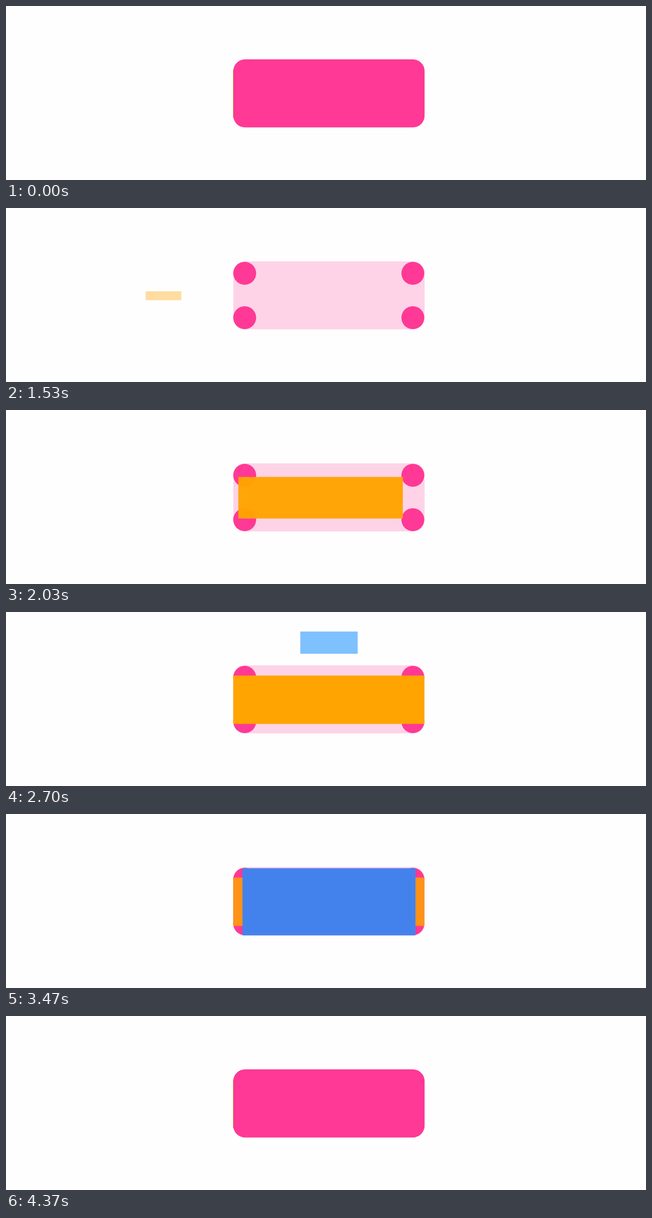
Recreate the animation shown at these times as an HTML page with a canvas. Size 1280 px wide and 349 px high, loop 4.41 s.

```html
<!DOCTYPE html>
<html lang="en">
<head>
<meta charset="utf-8">
<title>Rounded rectangle parts</title>
<style>
html, body { margin: 0; width: 100%; height: 100%; overflow: hidden; background: #fefefe; }
canvas { display: block; width: 1280px; height: 349px; }
</style>
</head>
<body>
<canvas id="stage" width="1280" height="349"></canvas>
<script>
const ctx = document.getElementById('stage').getContext('2d');
const LOOP = 4410;
const PINK = [255, 57, 149], ORANGE = [255, 164, 0], BLUE = [30, 144, 255];
const FAINT = 0.215;

const progress = (t, start, length) => Math.min(1, Math.max(0, (t - start) / length));
const easeOut = p => 1 - Math.pow(1 - p, 1.7);
// Travel settles early, while the size keeps growing until the end.
const travel = p => 1 - (1 - p) ** 2 * (1 - Math.pow(p, 2.7));
const growth = p => p + 1.18 * p * (1 - p) * (p - 0.28);
const mix = (a, b, k) => a.map((v, i) => v + (b[i] - v) * k);
const rgba = (c, alpha) => `rgba(${c.map(Math.round).join(',')},${alpha})`;

function drawBase(alpha) {
  ctx.fillStyle = rgba(PINK, alpha);
  ctx.beginPath();
  ctx.roundRect(454.6, 107, 382.6, 136.6, 23.5);
  ctx.fill();
}

function drawCorners(alpha) {
  ctx.fillStyle = rgba(PINK, alpha);
  for (const x of [477.4, 813.7]) {
    for (const y of [131, 220]) {
      ctx.beginPath();
      ctx.arc(x, y, 22.9, 0, Math.PI * 2);
      ctx.fill();
    }
  }
}

// Flies in from an offset (dx, dy) while growing and fading in.
function drawBar(p, cx, cy, w, h, dx, dy, color) {
  if (p <= 0) return;
  const e = travel(p), s = growth(p);
  ctx.fillStyle = rgba(color, e);
  ctx.fillRect(cx + dx * (1 - e) - w * s / 2, cy + dy * (1 - e) - h * s / 2, w * s, h * s);
}

function drawEdge(alpha) {
  ctx.fillStyle = rgba([180, 150, 30], alpha);
  ctx.fillRect(454, 128, 1, 96);
}

function draw(t) {
  ctx.fillStyle = '#fefefe';
  ctx.fillRect(0, 0, 1280, 349);

  const fade = easeOut(progress(t, 110, 530));
  const merge = easeOut(progress(t, 3370, 1000));
  drawBase(1 - (1 - FAINT) * fade + (1 - FAINT) * merge);
  drawCorners(easeOut(progress(t, 288, 910)));
  drawBar(progress(t, 1350, 900), 645.6, 176, 382.4, 97, -525, 0, mix(ORANGE, PINK, merge));
  drawBar(progress(t, 2412, 900), 646, 176.2, 346, 134.5, 0, -261, mix(BLUE, PINK, merge));

  const edge = t < 1000 ? 1 - fade : merge;
  if (edge > 0) drawEdge(0.8 * edge);
}

const begin = performance.now();
function tick() {
  draw((performance.now() - begin) % LOOP);
  requestAnimationFrame(tick);
}
tick();
</script>
</body>
</html>
```
